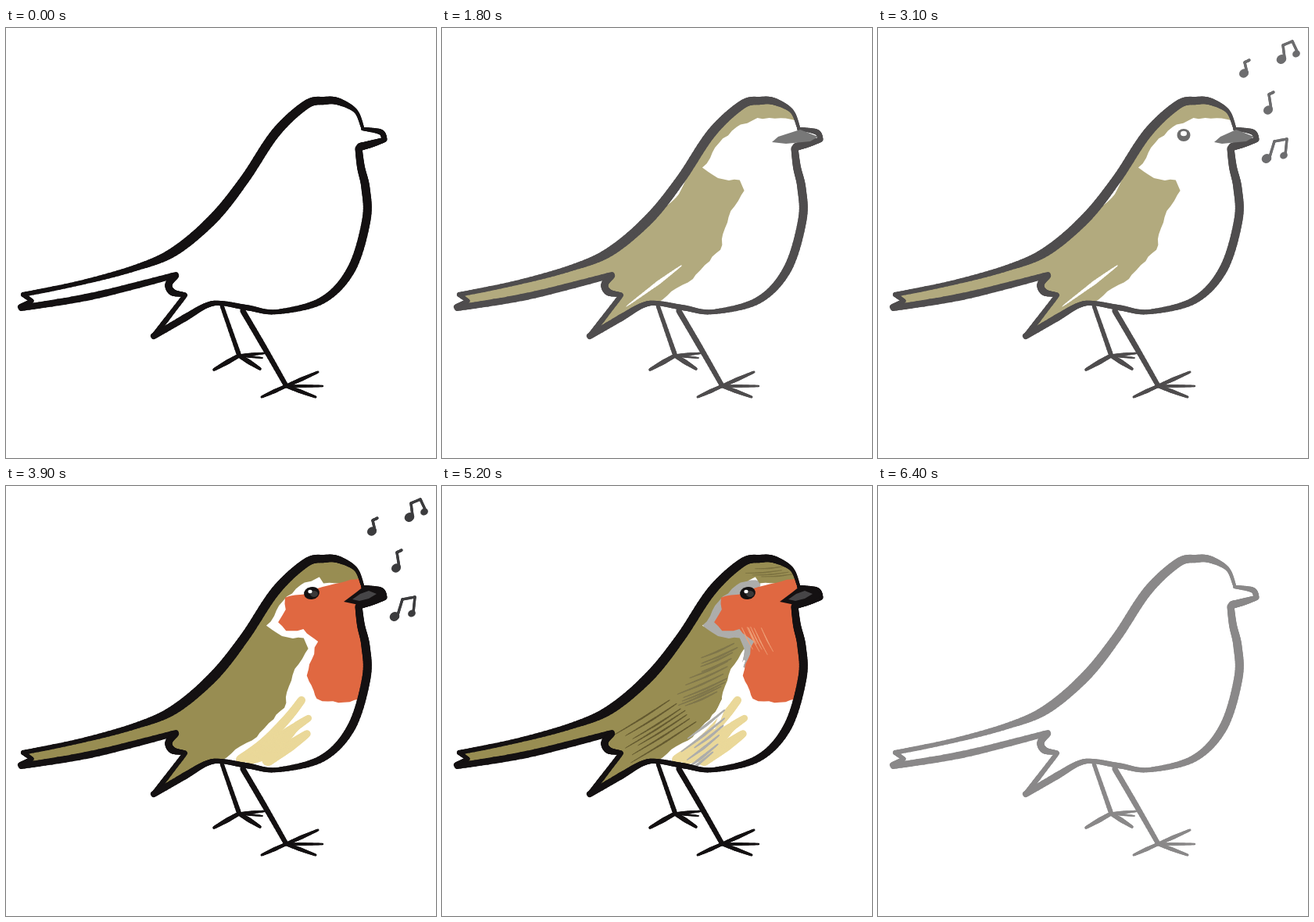
An HTML page with a canvas that plays this animation: 550x550 px, repeating every 6500 ms.

```html
<!DOCTYPE html>
<html lang="en">
<head>
<meta charset="utf-8">
<title>Robin drawn in stages</title>
<style>
  html, body { margin: 0; width: 100%; height: 100%; overflow: hidden; background: #fff; }
  canvas { display: block; width: 550px; height: 550px; }
</style>
</head>
<body>
<canvas id="stage" width="550" height="550"></canvas>
<script>
const ctx = document.getElementById('stage').getContext('2d');
const INK = '#141112', OLIVE = '#988d52', ORANGE = '#e06841', CREAM = '#ead899';
const GREY = '#adadab', NOTE = '#3c3c3e', BEAK = '#4b4b4b';

let seed = 1;
function random() {
  seed = seed * 16807 % 2147483647;
  return seed / 2147483647;
}
const jitter = size => (random() - .5) * 2 * size;
const mix = (a, b, t) => a + (b - a) * t;

// Catmull-Rom value between b and c
function spline(a, b, c, d, t) {
  return b + t / 2 * (c - a + t * (2 * a - 5 * b + 4 * c - d + t * (3 * (b - c) + d - a)));
}

// Samples a smooth line given by x, y, width points
function sample(points, steps = 12) {
  const last = points.length - 1, out = [points[0]];
  for (let i = 0; i < last; i++) {
    const a = points[Math.max(0, i - 1)], b = points[i], c = points[i + 1], d = points[Math.min(last, i + 2)];
    for (let s = 1; s <= steps; s++) {
      const t = s / steps;
      out.push([spline(a[0], b[0], c[0], d[0], t), spline(a[1], b[1], c[1], d[1], t), mix(b[2], c[2], t)]);
    }
  }
  return out;
}

function brush(points, color = INK) {
  ctx.strokeStyle = color;
  ctx.lineCap = 'round';
  sample(points).forEach(([x, y, w], i, all) => {
    if (!i) return;
    ctx.lineWidth = w;
    ctx.beginPath();
    ctx.moveTo(all[i - 1][0], all[i - 1][1]);
    ctx.lineTo(x, y);
    ctx.stroke();
  });
}

function trace(points) {
  const path = new Path2D();
  points.forEach(([x, y]) => path.lineTo(x, y));
  path.closePath();
  return path;
}

function shape(points, color) {
  ctx.fillStyle = color;
  ctx.fill(trace(points));
}

// Polygon with an uneven, hand-painted edge
function daub(points, color) {
  const edge = [];
  points.forEach(([x, y], i) => {
    const [nx, ny] = points[(i + 1) % points.length];
    const n = Math.ceil(Math.hypot(nx - x, ny - y) / 8);
    for (let s = 0; s < n; s++) edge.push([mix(x, nx, s / n) + jitter(1.2), mix(y, ny, s / n) + jitter(1.2)]);
  });
  shape(edge, color);
}

function oval(x, y, rx, ry, color, turn = 0) {
  ctx.fillStyle = color;
  ctx.beginPath();
  ctx.ellipse(x, y, rx, ry, turn, 0, 7);
  ctx.fill();
}

// Row of n tapering strokes that start between two points
function fan(n, [x1, y1], [x2, y2], [dx, dy], color, width) {
  for (let i = 0; i < n; i++) {
    const t = i / (n - 1), k = .75 + random() * .5;
    const x = mix(x1, x2, t) + jitter(4), y = mix(y1, y2, t) + jitter(2);
    brush([[x, y, width * .5], [x + dx * k / 2, y + dy * k / 2 + 1, width], [x + dx * k, y + dy * k, width * .4]], color);
  }
}

const contour = [
  // back, from the beak to the tail
  [[456, 127, 4], [447, 106, 5], [425, 94, 9], [407, 93, 10], [384, 98, 11], [345, 134, 12],
    [305, 194, 12], [265, 244, 13], [215, 286, 12], [165, 307, 8], [95, 326, 6], [22, 341, 6]],
  // tail, notch and wing tip
  [[22, 341, 6], [33, 349, 5]],
  [[33, 349, 5], [19, 357, 8]],
  [[20, 358, 8], [110, 343, 9], [217, 316, 8]],
  [[217, 317, 8], [208, 328, 9], [213, 338, 9], [229, 341, 5]],
  [[229, 342, 6], [189, 394, 7]],
  // belly, up to the throat
  [[189, 394, 8], [230, 370, 9], [256, 355, 7], [275, 352, 6], [310, 358, 7], [347, 363, 6],
    [405, 348, 9], [442, 308, 11], [461, 245, 11], [460, 205, 11], [454, 178, 10], [451, 154, 9]]
];
const body = trace(contour.flatMap(line => sample(line)));

function foot(x, y, toes) {
  toes.forEach(([dx, dy, w]) => brush([[x, y, w * .8], [x + dx / 2, y + dy / 2, w], [x + dx, y + dy, w * .6]]));
}

function outline() {
  contour.forEach(line => brush(line));
  brush([[456, 129, 4], [479, 133, 7], [484, 142, 7]]);
  brush([[484, 143, 6], [468, 148, 9], [453, 152, 10]]);
  brush([[276, 355, 5], [298, 418, 6]]);
  brush([[303, 362, 7], [330, 408, 7], [358, 457, 6]]);
  foot(298, 419, [[-32, 18, 6], [27, 17, 6], [32, -3, 4], [30, 3, 3]]);
  foot(358, 458, [[-31, 14, 5], [41, -18, 5], [47, 0, 4], [38, 14, 5]]);
}

function plumage() {
  daub([[460, 121], [440, 115], [403, 116], [376, 126], [354, 147], [334, 179], [352, 193], [381, 195],
    [387, 208], [369, 234], [359, 264], [357, 283], [320, 320], [275, 352], [275, 420], [0, 420], [0, 0], [460, 0]], OLIVE);
}

function gaps() {
  brush([[312, 192, 1], [300, 212, 5], [288, 225, 3]], '#fff');
  brush([[306, 304, 1], [275, 327, 5], [236, 356, 1]], '#fff');
}

function breast() {
  daub([[398, 113], [460, 110], [460, 124], [406, 124]], OLIVE);
  daub([[456, 117], [412, 127], [383, 138], [357, 143], [358, 158], [349, 175], [358, 185], [380, 184],
    [398, 200], [384, 242], [391, 256], [397, 273], [432, 278], [452, 272], [475, 250], [475, 117]], ORANGE);
  brush([[378, 274, 10], [360, 297, 11], [330, 328, 12], [300, 350, 12]], CREAM);
  brush([[387, 297, 8], [368, 310, 11], [340, 335, 22], [312, 350, 12]], CREAM);
  brush([[385, 317, 9], [362, 333, 14], [335, 350, 16]], CREAM);
}

function band() {
  brush([[402, 126, 10], [376, 133, 18], [350, 155, 20], [346, 180, 20], [380, 190, 18], [394, 206, 16], [389, 228, 10]], GREY);
}

function feathers() {
  fan(8, [384, 222], [358, 285], [-13, 26], '#fff', 4);
  fan(6, [364, 285], [345, 342], [-44, 34], GREY, 3.5);
  fan(11, [376, 200], [355, 265], [-50, 22], '#7f764b', 2.6);
  fan(7, [294, 275], [322, 302], [-70, 44], '#645a30', 2.2);
  fan(4, [432, 102], [446, 114], [-38, 3], '#7c7240', 1.6);
  fan(6, [384, 180], [408, 180], [14, 28], '#eda078', 1.3);
}

function softBeak(tip) {
  shape([[tip, 146], [tip + 8, 139], [458, 130], [481, 139], [471, 145], [440, 148]], BEAK);
}

function darkBeak() {
  shape([[432, 148], [448, 136], [458, 128], [478, 131], [485, 140], [470, 149], [451, 152]], INK);
  shape([[443, 145], [453, 138], [464, 134], [474, 138], [464, 144], [452, 147]], '#464547');
}

function paleEye() {
  oval(391, 137, 8.5, 8, '#3b3b3b');
  oval(391, 135, 4, 3.2, '#fff');
}

function darkEye() {
  oval(391, 137, 10, 8, INK, -.2);
  oval(394, 138, 5, 4, '#3b3939');
  oval(389, 135, 2.6, 2.3, '#fff');
}

const noteHead = (x, y, r) => oval(x, y, r, r * .88, NOTE, -.5);
const noteLine = (...points) => brush(points.map(([x, y]) => [x, y, 3.4]), NOTE);

function singleNote(x, y, height) {
  noteHead(x, y, 6.2);
  noteLine([x + 4, y - 1], [x + 1, y - height]);
  noteLine([x + 1, y - height], [x + 7, y - height - 3]);
}

function notePair([x1, y1], [x2, y2], top1, top2) {
  noteHead(x1, y1, 6.5);
  noteHead(x2, y2, 5);
  noteLine([x1 + 4, y1 - 2], top1);
  noteLine(top1, top2);
  noteLine(top2, [x2 + 2, y2 - 1]);
}

function notes() {
  singleNote(468, 58, 14);
  singleNote(499, 105, 20);
  notePair([516, 40], [535, 33], [518, 22], [530, 17]);
  notePair([497, 167], [519, 163], [507, 145], [523, 142]);
}

function inBody(...layers) {
  ctx.save();
  ctx.clip(body);
  layers.forEach(layer => layer());
  ctx.restore();
}

const scenes = [
  () => outline(),
  () => { inBody(plumage, gaps); outline(); softBeak(422); },
  () => { inBody(plumage, gaps); outline(); softBeak(430); paleEye(); notes(); },
  () => { inBody(plumage, breast); outline(); darkBeak(); darkEye(); notes(); },
  () => { inBody(band, plumage, breast, feathers); outline(); darkBeak(); darkEye(); }
];

// Each cycle: hold, fade to white, pause, fade in the next scene
const CYCLE = 1300, LOOP = CYCLE * scenes.length;

function stateAt(time) {
  const t = time % LOOP, scene = Math.floor(t / CYCLE), step = Math.floor(t % CYCLE / 100);
  if (step < 5) return [scene, 1];
  if (step < 8) return [scene, 1 - 1 / (9 - step)];
  if (step < 10) return [scene, 0];
  return [(scene + 1) % scenes.length, 1 / (14 - step)];
}

let shown = '';
function draw(time) {
  const [scene, alpha] = stateAt(time), key = scene + ':' + alpha;
  if (key === shown) return;
  shown = key;
  seed = 7;
  ctx.fillStyle = '#fff';
  ctx.fillRect(0, 0, 550, 550);
  scenes[scene]();
  ctx.fillStyle = `rgba(255,255,255,${1 - alpha})`;
  ctx.fillRect(0, 0, 550, 550);
}

const start = performance.now();
function tick() {
  draw(performance.now() - start);
  requestAnimationFrame(tick);
}
tick();
</script>
</body>
</html>
```
